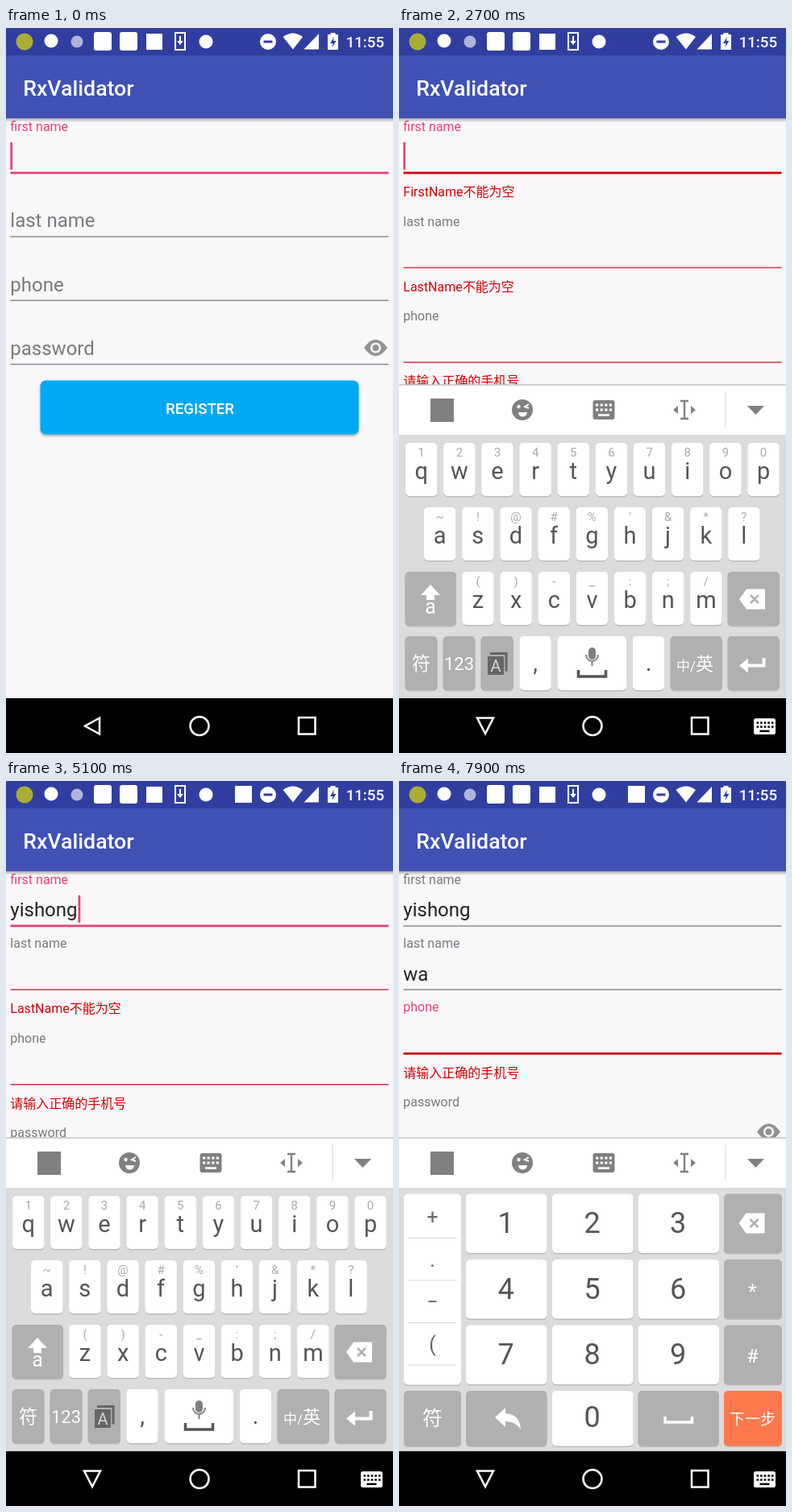
An HTML page that plays this animation: 480 px wide and 900 px high, repeating every 8000 ms.

```html
<!DOCTYPE html>
<html lang="zh">
<head>
<meta charset="utf-8">
<title>RxValidator</title>
<style>
html, body { margin: 0; width: 100%; height: 100%; overflow: hidden; background: #f9f7fa; }
svg { display: block; width: 480px; height: 900px; }
text { font-family: Roboto, 'Noto Sans CJK SC', 'Noto Sans CJK', sans-serif; white-space: pre; }
</style>
</head>
<body>
<svg id="stage" viewBox="0 0 480 900">
  <defs>
    <clipPath id="viewport"><rect id="viewRect" y="112" width="480" height="721"/></clipPath>
    <clipPath id="composeClip"><rect id="composeClipRect" y="405" width="30" height="38"/></clipPath>
    <linearGradient id="barShadow" x2="0" y2="1">
      <stop offset="0" stop-color="#000" stop-opacity=".32"/><stop offset="1" stop-color="#000" stop-opacity="0"/>
    </linearGradient>
    <filter id="lift" x="-10%" y="-20%" width="120%" height="150%">
      <feDropShadow dx="0" dy="2" stdDeviation="1.6" flood-opacity=".32"/>
    </filter>
  </defs>
  <rect width="480" height="900" fill="#f9f7fa"/>

  <g clip-path="url(#viewport)">
    <g id="form"></g>
    <g id="button">
      <rect x="42.5" y="437.5" width="395" height="67" rx="7" fill="#03a9f4" filter="url(#lift)"/>
      <rect id="press" x="42.5" y="437.5" width="395" height="67" rx="7" fill="#fff"/>
      <text x="240.5" y="479" font-size="18.67" font-weight="500" fill="#fff" text-anchor="middle">REGISTER</text>
    </g>
  </g>

  <rect y="112" width="480" height="5" fill="url(#barShadow)"/>
  <rect y="33" width="480" height="79" fill="#3f51b5"/>
  <rect width="480" height="34" fill="#303f9f"/>
  <text x="21.3" y="84" font-size="26.67" font-weight="500" fill="#fff">RxValidator</text>

  <g fill="#fff">
    <circle cx="23" cy="17" r="10.5" fill="#a9ad35"/>
    <circle cx="56" cy="16" r="8.5"/>
    <circle cx="88" cy="17" r="7.5" fill="#aeb5dc"/>
    <rect x="109" y="5" width="22" height="23" rx="3"/>
    <rect x="141" y="5" width="22" height="23" rx="3"/>
    <rect x="174" y="7" width="20" height="20"/>
    <path d="M210 6h12v21h-12z" fill="none" stroke="#fff" stroke-width="2"/>
    <path d="M215 10h2v6h3l-4 5-4-5h3z"/>
    <circle cx="248" cy="17" r="8.5"/>
    <rect id="imeIcon" x="284" y="6" width="21" height="21"/>
    <path fill-rule="evenodd" d="M315 17a10 10 0 0 1 20 0a10 10 0 0 1-20 0zM319.500 15.500v3h11v-3z"/>
    <path d="M343.500 11Q356 2 368 11L356 26.500zM388 7v19.500h-18.500z"/>
    <path d="M402.500 8v-2h6v2h3.500v19h-13V8z"/>
    <path d="M407 11l-5 8h3.500l-1 5 5-8H406z" fill="#303f9f"/>
    <text x="469" y="24" font-size="18.67" font-weight="500" text-anchor="end">11:55</text>
  </g>

  <g id="compose">
    <rect id="composeBox" x="-2" y="407" height="36" fill="#fff" fill-opacity=".85" stroke="#d0ced2"/>
    <text id="composeText" x="9" y="434" font-size="25" fill="#555" clip-path="url(#composeClip)"></text>
  </g>

  <g id="keyboard">
    <rect y="443" width="480" height="390" fill="#dcdbdd"/>
    <rect y="443" width="480" height="62" fill="#fff"/>
    <path d="M0 443h480" stroke="#c4c2c5" stroke-width="1.5"/>
    <g id="tools" fill="#808080">
      <rect x="39" y="460" width="29" height="29"/>
      <circle cx="153" cy="474" r="13"/>
      <path d="M148 477h11a5.500 5.500 0 0 1-11 0z" fill="#fff"/>
      <path d="M161 467l-5 3 5 2" fill="none" stroke="#fff" stroke-width="2"/>
      <circle cx="148.500" cy="470" r="2.200" fill="#fff"/>
      <rect x="240.500" y="462" width="27" height="24" rx="3"/>
      <path d="M244 468h20M244 474h20" stroke="#fff" stroke-width="3" stroke-dasharray="3.200 2.400"/>
      <path d="M247 480.500h14" stroke="#fff" stroke-width="2.500"/>
      <path d="M349 463h10M354 463v22M349 485h10" fill="none" stroke="#808080" stroke-width="2.400"/>
      <path d="M346 469v10l-6-5zM362 469v10l6-5zM432 469h21l-10.500 11z"/>
      <path d="M405 451v45" stroke="#e4e3e5" stroke-width="1.500"/>
    </g>
    <g id="suggest">
      <text id="words" x="22" y="486" font-size="30"></text>
      <path d="M405 451v45" stroke="#d2d0d3" stroke-width="1.500"/>
      <path id="more" d="M437 465l10 10.500-10 10.500" fill="none" stroke-width="2.500"/>
    </g>
    <g id="letters"></g>
    <g id="digits"></g>
    <g id="popup">
      <rect width="66" height="75" rx="5" fill="#fff" filter="url(#lift)"/>
      <text id="popupText" x="33" font-size="56" fill="#ff7750" text-anchor="middle"></text>
    </g>
  </g>

  <rect y="832" width="480" height="68"/>
  <g fill="none" stroke="#fff" stroke-width="2.500">
    <path id="back"/>
    <circle cx="240" cy="866.500" r="11.500"/>
    <rect x="363" y="856" width="20.500" height="20.500"/>
  </g>
  <g id="imeSwitch">
    <rect x="440" y="857" width="27" height="20" rx="2.500" fill="#fff"/>
    <path d="M443.500 862.500h21M443.500 867.500h21" stroke="#000" stroke-width="2.600" stroke-dasharray="2.600 2"/>
    <path d="M447.500 872.800h12" stroke="#000" stroke-width="2.400"/>
  </g>
</svg>

<script>
const LOOP = 8000, STEP = 100;
const PINK = '#ec407a', RED = '#d50000', DARK = '#555', WHITE = '#fff', GREY = '#b1afb1';
const $ = id => document.getElementById(id);

function add(parent, tag, attrs, text) {
  const node = document.createElementNS('http://www.w3.org/2000/svg', tag);
  set(node, attrs);
  if (text) node.textContent = text;
  return parent.appendChild(node);
}
function set(node, attrs) {
  for (const name in attrs) node.setAttribute(name, attrs[name]);
}
const show = (node, on) => set(node, { visibility: on ? 'visible' : 'hidden' });
const label = (g, s, x, y, size, fill) =>
  add(g, 'text', { x, y, 'font-size': size, fill, 'text-anchor': 'middle' }, s);

const pen = document.createElement('canvas').getContext('2d');
function widthOf(s, size) {
  pen.font = size + 'px Roboto, sans-serif';
  return pen.measureText(s).width;
}

// Form
const fields = [
  ['first name', 'FirstName不能为空'],
  ['last name', 'LastName不能为空'],
  ['phone', '请输入正确的手机号'],
  ['password', '密码长度不能小于6']
].map(([hint, error], i) => {
  const g = add($('form'), 'g', {});
  if (i === 3) {
    add(g, 'path', { d: 'M444 -20.500Q458.500 -41 473 -20.500Q458.500 0 444 -20.500z', fill: '#919092' });
    add(g, 'circle', { cx: 458.5, cy: -20.5, r: 5.3, fill: '#919092', stroke: '#f9f7fa', 'stroke-width': 2.6 });
  }
  return {
    g,
    line: add(g, 'path', { d: 'M5.500 0H474.500' }),
    hint: add(g, 'text', { x: 5.3 }, hint),
    error: add(g, 'text', { x: 5.3, y: 29.4, 'font-size': 16, fill: RED }, error),
    value: add(g, 'text', { x: 5.3, y: -11.5, 'font-size': 24, fill: '#222' }),
    caret: add(g, 'rect', { y: -38, width: 2.7, height: 34, fill: PINK })
  };
});

// Keyboards
function key(g, x, y, w, h, fill) {
  add(g, 'rect', { x, y: y + 1.5, width: w, height: h, rx: 5, fill: '#bdbbbe' });
  return add(g, 'rect', { x, y, width: w, height: h, rx: 5, fill });
}
function backspace(g, x, y) {
  add(g, 'path', { d: `M${x - 16} ${y}l9-12.500h23v25h-23z`, fill: WHITE });
  add(g, 'path', { d: `M${x - 2} ${y - 5}l10 10m0-10l-10 10`, stroke: GREY, 'stroke-width': 2.5 });
}

const PITCH = 47.15, keyAt = {}, letters = $('letters'), digits = $('digits');
[['qwertyuiop', '1234567890', 8], ['asdfghjkl', "~!@#%'&*?", 31], ['zxcvbnm', '()-_:;/', 78.3]]
  .forEach(([chars, marks, left], row) => [...chars].forEach((c, i) => {
    const x = left + PITCH * i, y = 515 + 80 * row, mid = x + 19.7;
    key(letters, x, y, 39.4, 66, WHITE);
    label(letters, marks[i], mid, y + 16.5, 15, '#aaa8ab');
    label(letters, c, mid, y + 44.5, 29, DARK);
    keyAt[c] = { mid, y };
  }));
[[7.5, 675, 63.5], [407.5, 675, 64.5], [7.5, 755, 40], [54.5, 755, 40], [101.5, 755, 40.5],
 [336.5, 755, 64.5], [407.5, 755, 64.5]].forEach(([x, y, w]) => key(letters, x, y, w, 67, GREY));
key(letters, 149.5, 755, 39, 67, WHITE);
const space = key(letters, 196.5, 755, 85.5, 67, WHITE);
key(letters, 290, 755, 39, 67, WHITE);
add(letters, 'path', { d: 'M39 691l12 13h-7v6H34v-6h-7z', fill: WHITE });
label(letters, 'a', 39, 727, 25, WHITE);
backspace(letters, 438, 709);
label(letters, '符', 27.5, 797, 23, WHITE);
label(letters, '123', 74.5, 797, 22, WHITE);
add(letters, 'path', { d: 'M113 776.500h20v22', fill: 'none', stroke: '#666', 'stroke-width': 3 });
add(letters, 'rect', { x: 110, y: 780, width: 20, height: 23, fill: '#666' });
label(letters, 'A', 120, 799, 20, '#d5d4d6');
label(letters, ',', 169, 798, 29, DARK);
label(letters, '.', 309.5, 798, 29, DARK);
add(letters, 'rect', { x: 235, y: 769, width: 9, height: 15, rx: 4.5, fill: '#808080' });
add(letters, 'path', { d: 'M232 778a7.500 8 0 0 0 15 0M239.500 786v6', fill: 'none', stroke: '#808080', 'stroke-width': 2 });
add(letters, 'path', { d: 'M222.500 797v8h34v-8', fill: 'none', stroke: DARK, 'stroke-width': 3.5 });
label(letters, '中/', 356, 798, 17, WHITE);
label(letters, '英', 379, 797, 22, WHITE);
add(letters, 'path', { d: 'M452.500 782v9.500H431', fill: 'none', stroke: WHITE, 'stroke-width': 4 });
add(letters, 'path', { d: 'M422 791.500l11-9v18z', fill: WHITE });

const rowTop = [512.5, 594, 675.5, 757], colLeft = [83, 190, 296.5];
key(digits, 6, 512.5, 71, 237, WHITE);
['+', '.', '−', '('].forEach((c, i) => {
  label(digits, c, 41.5, 550 + 52.5 * i, 25, '#666');
  add(digits, 'path', { d: `M11 ${567.5 + 52.5 * i}h61`, stroke: '#d8d7d9' });
});
for (let n = 1; n <= 9; n++) {
  const x = colLeft[(n - 1) % 3], y = rowTop[Math.floor((n - 1) / 3)];
  key(digits, x, y, 100.5, 73.5, WHITE);
  label(digits, String(n), x + 49.5, y + 48.5, 36, DARK);
}
rowTop.forEach((y, i) => key(digits, 403, y, 72, i < 3 ? 73.5 : 68.5, i < 3 ? GREY : '#ff784d'));
backspace(digits, 437.5, 549);
label(digits, '*', 438.5, 643, 25, WHITE);
label(digits, '#', 438.5, 722, 24, WHITE);
label(digits, '下一步', 438.5, 799, 19, WHITE);
key(digits, 6, 757, 71, 68.5, GREY);
label(digits, '符', 41.5, 800, 25, WHITE);
key(digits, 83, 757, 100.5, 68.5, GREY);
add(digits, 'path', { d: 'M119 790l13-12v7q18 1 19 20q-6-10-19-10v7z', fill: WHITE });
key(digits, 190, 757, 100.5, 68.5, WHITE);
label(digits, '0', 239.5, 802, 36, DARK);
key(digits, 296.5, 757, 100.5, 68.5, GREY);
add(digits, 'path', { d: 'M330 789v7h33.500v-7', fill: 'none', stroke: WHITE, 'stroke-width': 3.5 });

// Timeline
const typing = [
  { word: 'yishong', at: [3400, 3600, 3900, 4100, 4300, 4400, 4600], commit: 4900,
    more: [['y', 'yes', 'you', 'yet'], ['yi', 'yishong', 'yip', 'yin']] },
  { word: 'wa', at: [6400, 6700], commit: 7000,
    more: [['w', 'we', 'was', 'with'], ['wa', 'was', 'way', 'want']] }
];
const caretOn = [[0, 100], [700, 1200], [1700, 2100], [2500, 3100], [3600, 4100], [4700, 5400], [5800, 6400], [6900, 7900]];
const within = (t, a, b) => t >= a && t < b;
const ramp = (t, a, b) => Math.min(1, Math.max(0, (t - a) / (b - a)));
const typedAt = (run, t) => t < run.commit ? run.word.slice(0, run.at.filter(a => a <= t).length) : '';

function drawForm(t) {
  const focus = t < 5900 ? 0 : t < 7400 ? 1 : 2;
  const blink = caretOn.some(([a, b]) => within(t, a, b));
  let y = 179.9;
  fields.forEach((f, i) => {
    const run = typing[i], gone = run ? run.commit : LOOP, active = i === focus;
    const failed = within(t, 1400, gone + 100);
    const fixed = t >= gone;
    const float = i ? ramp(t, 1400, 1700) * (t < 1600 ? 0.8 : 1) : 1;
    const lift = float * float;
    const value = run && fixed ? run.word : '';
    set(f.g, { transform: `translate(0 ${y})` });
    set(f.line, {
      stroke: failed && !fixed ? (active ? RED : '#d0363f') : active ? PINK : '#8d8b8e',
      'stroke-width': active ? 2.7 : 1.5
    });
    set(f.hint, { y: -11.8 - 40.2 * lift, 'font-size': 24 - 8 * float, fill: active ? PINK : '#7b797c' });
    set(f.error, { opacity: !failed ? 0 : fixed ? 0.4 : 0.3 + 0.7 * ramp(t, 1400, 1640) });
    f.value.textContent = value;
    set(f.caret, { x: 5.3 + (value ? widthOf(value, 24) + 1 : 0) });
    show(f.caret, active && blink);
    y += 79.2 + (failed ? 38.4 : 0);
  });
  set($('button'), { transform: `translate(0 ${y - 496.7})` });
  set($('press'), { opacity: within(t, 1200, 1400) ? 0.2 : 0 });
}

function drawKeyboard(t) {
  const up = t >= 2600, run = typing.find(r => typedAt(r, t));
  show($('keyboard'), t >= 2500);
  set($('keyboard'), { transform: `translate(0 ${up ? 0 : 160})` });
  set($('viewRect'), { height: up ? 331 : 721 });
  set($('letters'), { display: t < 7400 ? 'inline' : 'none' });
  set($('digits'), { display: t < 7400 ? 'none' : 'inline' });
  set($('tools'), { display: run ? 'none' : 'inline' });
  for (const id of ['suggest', 'compose', 'popup']) set($(id), { display: run ? 'inline' : 'none' });
  set(space, { fill: typing.some(r => within(t, r.commit - 100, r.commit)) ? '#cfced0' : WHITE });
  show($('imeIcon'), t >= 3400);
  show($('imeSwitch'), up);
  set($('back'), { d: up ? 'M97 856.500h20l-10 19.500z' : 'M116 856.500v20l-18-10z' });
  if (!run) return;

  const typed = typedAt(run, t), first = typed[0];
  const words = run.more[typed.length - 1] || [typed, first, first.toUpperCase()];
  $('words').textContent = '';
  words.forEach((w, i) => add($('words'), 'tspan', { dx: i ? 29 : 0, fill: i ? DARK : '#ff7750' }, w));
  set($('more'), { stroke: words.length > 3 ? '#808080' : '#bdbbbe' });

  // The box takes the new width one step after the text.
  const box = widthOf(typedAt(run, t - STEP) || typed, 25) + 18;
  set($('composeBox'), { width: box + 2 });
  set($('composeClipRect'), { width: box });
  $('composeText').textContent = typed;

  const pressed = t - run.at[typed.length - 1] < 200;
  set($('popup'), { display: pressed ? 'inline' : 'none' });
  const c = typed.at(-1), { mid, y } = keyAt[c];
  const left = Math.min(412, Math.max(2, mid - 33));
  set($('popup'), { transform: `translate(${left} ${Math.max(448.5, y - 82)})` });
  set($('popupText'), { y: 'yg'.includes(c) ? 52 : 55 });
  $('popupText').textContent = c;
}

let last = -1;
function frame() {
  const t = Math.floor(performance.now() % LOOP / STEP) * STEP;
  if (t !== last) {
    last = t;
    drawForm(t);
    drawKeyboard(t);
  }
  requestAnimationFrame(frame);
}
frame();
</script>
</body>
</html>
```
